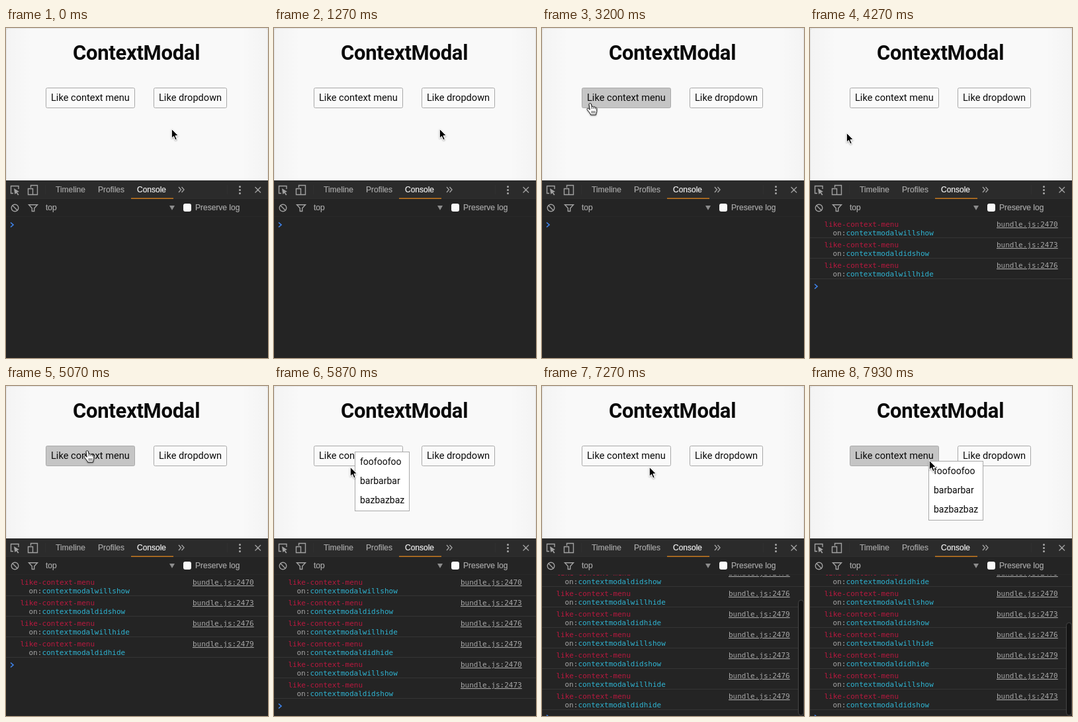
Write an HTML page that moves like this. It is 396 by 498 pixels and loops after 8 s.

```html
<!DOCTYPE html>
<html lang="en">
<head>
<meta charset="utf-8">
<title>ContextModal</title>
<style>
html, body { margin: 0; width: 100%; height: 100%; overflow: hidden; background: #242424; }
svg { display: block; width: 396px; height: 498px; }
text { white-space: pre; }
.page { font: 14.6px Roboto, sans-serif; fill: #0a0a0a; }
.title { font-size: 31px; font-weight: 700; letter-spacing: -.3px; }
.button { fill: #fafafa; stroke: #a9a9a9; }
.button.hover { fill: #c5c5c5; }
.menu { font-size: 14px; }
.tools { font: 12px "Liberation Sans", Arial, sans-serif; fill: #a8a8a8; stroke: #a8a8a8; stroke-width: .2px; }
.active { fill: #f2f2f2; stroke: #f2f2f2; }
.icon { fill: none; stroke: #a0a0a0; stroke-width: 1.4; }
.log { font: 11px "DejaVu Sans Mono", Menlo, monospace; fill: #a6a6a6; }
.name { fill: #b8193f; }
.event { fill: #2fb4d2; }
.link { text-decoration: underline; }
.rule { stroke: #353535; }
</style>
</head>
<body>
<svg viewBox="0 0 396 498">
  <defs>
    <clipPath id="view"><rect y="285" width="396" height="213"/></clipPath>
    <linearGradient id="sides">
      <stop stop-color="#000" stop-opacity=".022"/>
      <stop offset=".1" stop-color="#000" stop-opacity="0"/>
      <stop offset=".9" stop-color="#000" stop-opacity="0"/>
      <stop offset="1" stop-color="#000" stop-opacity=".022"/>
    </linearGradient>
    <filter id="shadow" x="-50%" y="-50%" width="200%" height="200%">
      <feDropShadow dx="0" dy="1" stdDeviation=".8" flood-opacity=".4"/>
    </filter>
  </defs>

  <g class="page">
    <rect width="396" height="231" fill="#e2e2e2"/>
    <path d="M1 231V4Q1 1 4 1H392Q395 1 395 4V231Z" fill="#f9f9f9"/>
    <rect x="1" y="1" width="394" height="230" fill="url(#sides)"/>
    <text class="title" x="101" y="47.5">ContextModal</text>
    <rect id="button" class="button" x="60.5" y="90.5" width="134" height="30" rx="2"/>
    <text x="68" y="110">Like context menu</text>
    <rect class="button" x="223.5" y="90.5" width="110" height="30" rx="2"/>
    <text x="231" y="110">Like dropdown</text>
    <g id="menu" class="menu">
      <rect x=".5" y=".5" width="82" height="89" fill="#fff" stroke="#a9a9a9"/>
      <text x="8" y="20">foofoofoo</text>
      <text x="8" y="49">barbarbar</text>
      <text x="8" y="78">bazbazbaz</text>
    </g>
  </g>

  <rect y="230" width="396" height="268" fill="#242424"/>
  <g id="console" class="log" clip-path="url(#view)">
    <g id="content">
      <g id="logs"></g>
      <path id="prompt" d="M7 293.5L11 297L7 300.5" fill="none" stroke="#3f86f0" stroke-width="1.6"/>
    </g>
    <rect id="thumb" x="387.5" width="8" rx="4" fill="#141414" stroke="#454545"/>
  </g>

  <g class="tools">
    <g stroke="none">
      <rect y="230" width="396" height="28" fill="#2b2b2b"/>
      <path d="M0 257.5H396M0 284.5H396" stroke="#3d3d3d"/>
      <path d="M59.5 237V251M334.5 237V251" stroke="#4a4a4a"/>
      <rect x="189" y="256.5" width="64" height="1.5" fill="#c87a20"/>
    </g>
    <text x="75" y="248">Timeline</text>
    <text x="139" y="248">Profiles</text>
    <text class="active" x="198" y="248">Console</text>
    <text x="60" y="275">top</text>
    <text x="286" y="275">Preserve log</text>
    <g class="icon">
      <path d="M19 243V238.5H7.5V249.5H11"/>
      <path d="M12 242L20 247L16.8 248L19.5 251.5L18 252.5L15.6 249L13.3 251Z" fill="#a0a0a0" stroke="none"/>
      <path d="M37.5 241V237.5H47.5V251.5H41M33.5 242.5H40.5V251.5H33.5Z"/>
      <path d="M261 240L264.5 244L261 248M265.500 240L269 244L265.500 248M376.500 240L385 248.500M385 240L376.500 248.500"/>
      <circle cx="13.500" cy="271.500" r="5.300"/>
      <path d="M9.800 267.800L17.200 275.200M34.500 266.700H47.500L42.700 272V276.500H39.300V272Z"/>
    </g>
    <g stroke="none">
      <circle cx="353.500" cy="239.500" r="1.500"/>
      <circle cx="353.500" cy="244.500" r="1.500"/>
      <circle cx="353.500" cy="249.500" r="1.500"/>
      <path d="M247 268H255L251 275Z" fill="#8c8c8c"/>
      <rect x="268" y="265" width="12" height="12" rx="3" fill="#fafafa"/>
    </g>
  </g>

  <g id="cursor" filter="url(#shadow)">
    <path id="arrow" d="M.3 .3V14.300L3.500 11.400L5.900 17L8.300 16L5.900 10.600H10.400Z" fill="#000" stroke="#fff"/>
    <g id="hand" stroke="#111" stroke-linejoin="round">
      <path d="M-2 1.200C-2 -.6 1 -.9 1.400 1L2.300 5C2.800 4 4.600 4.200 5 5.500C5.800 4.600 7.300 5 7.600 6.200C8.600 5.600 9.800 6.200 9.800 7.800V11.500C9.800 13.500 8.600 14.500 8.600 17H.6C.4 15 -2.400 12.600 -4.600 9.400C-5.800 7.600 -3.600 6.600 -2.200 8L-.7 9.200Z" fill="#fff"/>
      <path d="M2.300 5V8M5 5.500V8M7.600 6.200V8.500M2.500 11V15M4.700 11V15M6.900 11V15" fill="none" stroke-width=".8"/>
    </g>
  </g>
</svg>
<script>
const LOOP = 8000, STEP = LOOP / 120, ROW = 31, VIEW = 213, TOP = 285;
const phases = ["willshow", "didshow", "willhide", "didhide"];
const logTimes = [3260, 3390, 4190, 4330, 5320, 5460, 6460, 6590, 7730, 7860];
// Pointer stops: time, x, y
const stops = [
  [0, 250, 152], [1900, 250, 152], [2950, 73, 114], [3500, 73, 114],
  [4100, 55, 158], [4400, 55, 158], [4950, 123, 98], [5550, 123, 98],
  [6250, 104, 154], [6650, 104, 154], [7550, 180, 112], [LOOP, 180, 112]
];
const el = id => document.getElementById(id);
const show = (node, on) => node.setAttribute("visibility", on ? "visible" : "hidden");
const move = (node, x, y) => node.setAttribute("transform", `translate(${x} ${y})`);

el("logs").innerHTML = logTimes.map((_, i) => {
  const phase = i % 4;
  return `<g transform="translate(0 ${TOP + i * ROW})">
    <text class="name" x="21.500" y="15">like-context-menu</text>
    <text x="34.500" y="28">on:<tspan class="event">contextmodal${phases[phase]}</tspan></text>
    <text class="link" x="282" y="15">bundle.js:${2470 + phase * 3}</text>
    <path class="rule" d="M0 31.500H396"/></g>`;
}).join("");
const rows = [...el("logs").children];

function pointerAt(time) {
  const i = Math.max(1, stops.findIndex(s => s[0] > time));
  const [t0, x0, y0] = stops[i - 1], [t1, x1, y1] = stops[i];
  const p = (time - t0) / (t1 - t0), e = p * p * (3 - 2 * p);
  return [x0 + (x1 - x0) * e, y0 + (y1 - y0) * e];
}

function drawConsole(count) {
  rows.forEach((row, i) => show(row, i < count));
  move(el("prompt"), 0, count * ROW);
  const height = count * ROW + 10, scroll = Math.max(0, height - VIEW);
  move(el("content"), 0, -scroll);
  show(el("thumb"), scroll > 0);
  el("thumb").setAttribute("y", TOP + scroll * VIEW / height + 1);
  el("thumb").setAttribute("height", VIEW * Math.min(1, VIEW / height) - 2);
}

function draw(now) {
  const time = Math.floor((now + 4) / STEP) % 120 * STEP;
  const count = logTimes.filter(t => t <= time).length;
  const open = count % 4 === 1 || count % 4 === 2;
  const [x, y] = pointerAt(time);
  const anchor = open ? pointerAt(logTimes[count - count % 4]) : [0, 0];
  const inside = x >= 60 && x <= 195 && y >= 90 && y <= 121;
  const unmoved = Math.hypot(x - anchor[0], y - anchor[1]) < .5;
  const hand = inside && !open;

  el("button").classList.toggle("hover", inside && (!open || unmoved));
  show(el("menu"), open);
  move(el("menu"), Math.round(anchor[0]) - 1, Math.round(anchor[1]) + 1);
  show(el("hand"), hand);
  show(el("arrow"), !hand);
  move(el("cursor"), Math.round(x), Math.round(y));
  drawConsole(count);
}

function tick() {
  draw(performance.now());
  requestAnimationFrame(tick);
}
tick();
</script>
</body>
</html>
```
